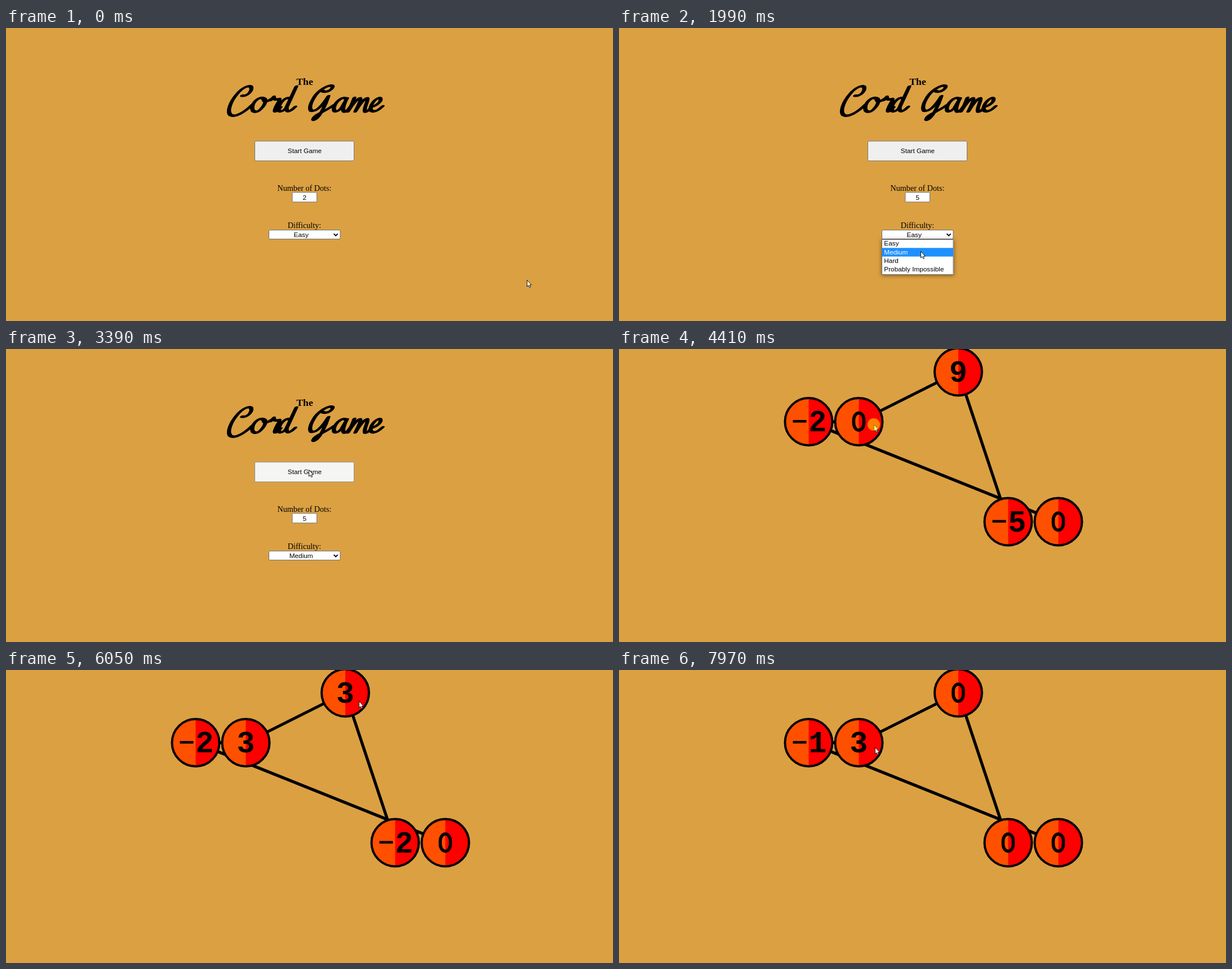
An HTML page with a canvas for the animation above (8 s loop, 1077 by 520 pixels).

```html
<!DOCTYPE html>
<html lang="en">
<head>
<meta charset="utf-8">
<title>The Cord Game</title>
<style>
html, body { margin: 0; width: 100%; height: 100%; overflow: hidden; background: #dba042; }
canvas { display: block; }
</style>
</head>
<body>
<canvas id="stage" width="1077" height="520"></canvas>
<script>
const ctx = document.getElementById('stage').getContext('2d');
const LOOP = 8000;
const BG = '#dba042';
const SERIF = '"Liberation Serif", "Times New Roman", serif';
const SANS = '"Liberation Sans", Arial, sans-serif';
const MONO = '"Liberation Mono", "Courier New", monospace';
const GAME_START = 3430;

// Pointer path: time, x, y
const path = [
  [30, 924, 447], [690, 545, 296], [1330, 545, 296], [1600, 555, 366],
  [1780, 555, 366], [1990, 535, 396], [2030, 535, 396], [2130, 533, 408],
  [2165, 533, 408], [2170, 533, 410], [2500, 533, 410], [2600, 534, 398],
  [2740, 534, 398], [3110, 537, 214], [3760, 537, 214], [4370, 452, 134],
  [4980, 452, 134], [5440, 612, 74], [5490, 612, 74], [5550, 626, 55],
  [6950, 626, 55], [7260, 739, 238], [7640, 452, 134], [7800, 452, 134],
  [7960, 454, 137]
];

// Mouse presses: down, up
const presses = [
  [690, 770], [860, 960], [1100, 1190], [1650, 1750], [2620, 2720],
  [3290, 3390], [4410, 4560], [4790, 4930], [5510, 5600], [5680, 5770],
  [5950, 6050], [6240, 6330], [6840, 6930], [7690, 7790]
];

const nodes = [[336.5, 129], [425.5, 129], [602, 40.5], [690.5, 306.5], [779.5, 306.5]];
const edges = [[0, 1], [1, 2], [2, 3], [0, 4]];
const startValues = [-2, 0, 9, -5, 0];

// Moves: time, node, amount passed to each neighbour
const moves = [
  [4560, 1, 1], [4930, 1, -1], [5600, 2, 1], [5770, 2, 1],
  [6050, 2, 1], [6330, 2, 1], [6930, 2, 1], [7790, 1, 1]
];
const neighbours = { 1: [0, 2], 2: [1, 3] };

const options = ['Easy', 'Medium', 'Hard', 'Probably Impossible'];

// Brush lettering of "Cord Game"
const lettering = new Path2D([
  'M419 120C428 122 437 112 435 105C432 100 419 106 410 117C398 131 392 148 398 154C406 160 424 149 437 136',
  'M457 125C449 121 438 131 437 141C436 150 446 151 452 144C460 136 463 127 457 125C457 131 463 132 470 126',
  'M470 128L475 122C474 128 480 127 485 126C487 128 478 138 477 146C477 150 483 147 487 141',
  'M505 126C499 120 487 130 484 141C482 150 490 150 497 142L515 104L498 141C497 150 503 150 513 140',
  'M562 112C570 116 582 107 579 103C572 99 552 112 545 126C538 138 538 147 544 147C553 147 564 134 572 121C566 140 556 158 549 162C543 165 544 159 552 154C564 147 574 143 581 137',
  'M604 126C598 120 585 130 582 141C580 150 588 150 595 142L605 125C600 134 596 146 600 148C603 150 608 144 612 138',
  'M618 124C615 132 612 140 607 148C614 136 624 124 628 125C631 127 624 139 620 148C626 138 636 124 641 125C644 128 634 142 637 148C639 150 644 146 648 141',
  'M648 140C658 138 667 130 664 125C659 122 649 132 647 141C646 151 657 150 668 139'
].join(''));
const nib = new DOMMatrix().rotate(-20).scale(7.8, 4);
const nibPath = new Path2D();
nibPath.addPath(lettering, nib.inverse());

function pointerAt(t) {
  if (t <= path[0][0]) return path[0].slice(1);
  for (let i = 1; i < path.length; i++) {
    const [t1, x1, y1] = path[i];
    if (t > t1) continue;
    const [t0, x0, y0] = path[i - 1];
    const u = (t - t0) / (t1 - t0);
    const e = u * u * (3 - 2 * u);
    return [x0 + (x1 - x0) * e, y0 + (y1 - y0) * e];
  }
  return path[path.length - 1].slice(1);
}

const inside = ([px, py], x, y, w, h) => px >= x && px <= x + w && py >= y && py <= y + h;

function text(str, x, y, font, color = '#000', align = 'center') {
  ctx.font = font;
  ctx.fillStyle = color;
  ctx.textAlign = align;
  ctx.fillText(str, x, y);
}

function box(x, y, w, h, r, fill, border, width = 1) {
  ctx.beginPath();
  ctx.roundRect(x, y, w, h, r);
  ctx.fillStyle = fill;
  ctx.fill();
  ctx.strokeStyle = border;
  ctx.lineWidth = width;
  ctx.stroke();
}

function drawTitle() {
  text('The', 530, 101, `bold 17.7px ${SERIF}`);
  ctx.save();
  ctx.transform(nib.a, nib.b, nib.c, nib.d, nib.e, nib.f);
  ctx.lineWidth = 1;
  ctx.lineCap = ctx.lineJoin = 'round';
  ctx.strokeStyle = '#000';
  ctx.stroke(nibPath);
  ctx.restore();
}

function drawButton(t, pointer) {
  let fill = '#eeefee', border = '#767676';
  if (t >= 3290) [fill, border] = ['#f5f5f4', '#8d8d8d'];
  else if (inside(pointer, 441, 200, 177, 36)) [fill, border] = ['#e5e5e5', '#4f4f4f'];
  box(441.5, 200.8, 176, 35, 2, fill, border);
  text('Start Game', 530, 222, `11.8px ${SANS}`);
}

function drawNumber(t, pointer) {
  text('Number of Dots:', 529.5, 288.5, `14.16px ${SERIF}`);
  const focus = t >= 690 && t < 1650;
  box(508, 291.8, 43.5, 17, focus ? 1.5 : 0.5, '#fff', focus ? '#101010' : '#767676', focus ? 1.8 : 1);
  const count = 2 + presses.slice(0, 3).filter(p => t >= p[0]).length;
  text(count, 529.7, 304.7, `11.8px ${SANS}`);
  if (!inside(pointer, 508, 291, 44, 18)) return;
  ctx.fillStyle = '#efefef';
  ctx.fillRect(538, 293.5, 12, 13.5);
  ctx.fillStyle = '#505050';
  for (const s of [-1, 1]) {
    ctx.beginPath();
    ctx.moveTo(541.5, 300.3 + 2 * s);
    ctx.lineTo(546.5, 300.3 + 2 * s);
    ctx.lineTo(544, 300.3 + 4.6 * s);
    ctx.fill();
  }
}

function drawSelect(t, pointer) {
  const font = `11.8px ${SANS}`;
  text('Difficulty:', 529.5, 355, `14.16px ${SERIF}`);
  box(466.5, 358.6, 126.5, 16, 2, '#fff', '#6a6a6a');
  text(t < 2720 ? 'Easy' : 'Medium', 523.7, 370.8, font);
  ctx.beginPath();
  ctx.moveTo(581.6, 365.2);
  ctx.lineTo(585.1, 368.7);
  ctx.lineTo(588.6, 365.2);
  ctx.lineWidth = 1.9;
  ctx.strokeStyle = '#000';
  ctx.stroke();
  if (t < 1650 || t >= 2720) return;

  const top = 375, row = 15.3;
  ctx.save();
  ctx.shadowColor = 'rgba(0,0,0,.5)';
  ctx.shadowBlur = 7;
  ctx.shadowOffsetY = 1;
  ctx.fillStyle = '#fff';
  ctx.fillRect(466, top, 127.5, 62.5);
  ctx.restore();
  ctx.strokeStyle = '#707070';
  ctx.lineWidth = 1;
  ctx.strokeRect(466.5, top + 0.5, 126.5, 62);
  const active = Math.max(0, Math.floor((pointer[1] - top) / row));
  options.forEach((name, i) => {
    const y = top + i * row;
    if (i === active) {
      ctx.fillStyle = '#1e90ff';
      ctx.fillRect(467, y, 126, row);
    }
    text(name, 470.3, y + 11.3, font, i === active ? '#fff' : '#000', 'left');
  });
}

function drawMenu(t, pointer) {
  drawTitle();
  drawButton(t, pointer);
  drawNumber(t, pointer);
  drawSelect(t, pointer);
}

function valuesAt(t) {
  const values = startValues.slice();
  for (const [time, node, n] of moves) {
    if (t < time) break;
    for (const k of neighbours[node]) {
      values[k] += n;
      values[node] -= n;
    }
  }
  return values;
}

function drawValue(value, x, y) {
  const step = 31.9;
  const chars = String(value);
  [...chars].forEach((c, i) => {
    const cx = x + (i - (chars.length - 1) / 2) * step;
    if (c === '-') {
      ctx.fillStyle = '#000';
      ctx.fillRect(cx - 12, y - 3, 24, 4.6);
    } else if (c === '0') {
      ctx.beginPath();
      ctx.roundRect(cx - 9, y - 15.5, 18, 30.5, { x: 9, y: 12.5 });
      ctx.lineWidth = 5.6;
      ctx.strokeStyle = '#000';
      ctx.stroke();
    } else {
      text(c, cx, y + 17, `bold 53.1px ${MONO}`);
    }
  });
}

function drawNode([x, y], value) {
  ctx.beginPath();
  ctx.arc(x, y, 42, 0, Math.PI * 2);
  ctx.fillStyle = '#ff5000';
  ctx.fill();
  ctx.beginPath();
  ctx.arc(x, y, 42, -Math.PI / 2, Math.PI / 2);
  ctx.fillStyle = '#f00';
  ctx.fill();
  ctx.beginPath();
  ctx.arc(x, y, 42, 0, Math.PI * 2);
  ctx.lineWidth = 4;
  ctx.strokeStyle = '#000';
  ctx.stroke();
  drawValue(value, x, y);
}

function drawGame(t) {
  ctx.strokeStyle = '#000';
  ctx.lineWidth = 5.3;
  for (const [a, b] of edges) {
    ctx.beginPath();
    ctx.moveTo(...nodes[a]);
    ctx.lineTo(...nodes[b]);
    ctx.stroke();
  }
  const values = valuesAt(t);
  nodes.forEach((node, i) => drawNode(node, values[i]));
}

const arrow = new Path2D('M.5 .5V12L3.1 9.7L4.8 13.5L6.7 12.7L5 9H8.4Z');

function drawPointer(t, [x, y]) {
  ctx.save();
  ctx.translate(x, y);
  ctx.fillStyle = '#fff';
  ctx.fill(arrow);
  ctx.lineWidth = 0.9;
  ctx.strokeStyle = '#000';
  ctx.stroke(arrow);
  if (presses.some(([down, up]) => t >= down && t < up)) {
    ctx.beginPath();
    ctx.arc(0, 0, 11, 0, Math.PI * 2);
    ctx.fillStyle = 'rgba(255,255,0,.5)';
    ctx.fill();
  }
  ctx.restore();
}

function draw(t) {
  ctx.fillStyle = BG;
  ctx.fillRect(0, 0, 1077, 520);
  const pointer = pointerAt(t);
  if (t < GAME_START) drawMenu(t, pointer);
  else drawGame(t);
  drawPointer(t, pointer);
}

const start = performance.now();
function tick() {
  draw((performance.now() - start) % LOOP);
  requestAnimationFrame(tick);
}
tick();
</script>
</body>
</html>
```
